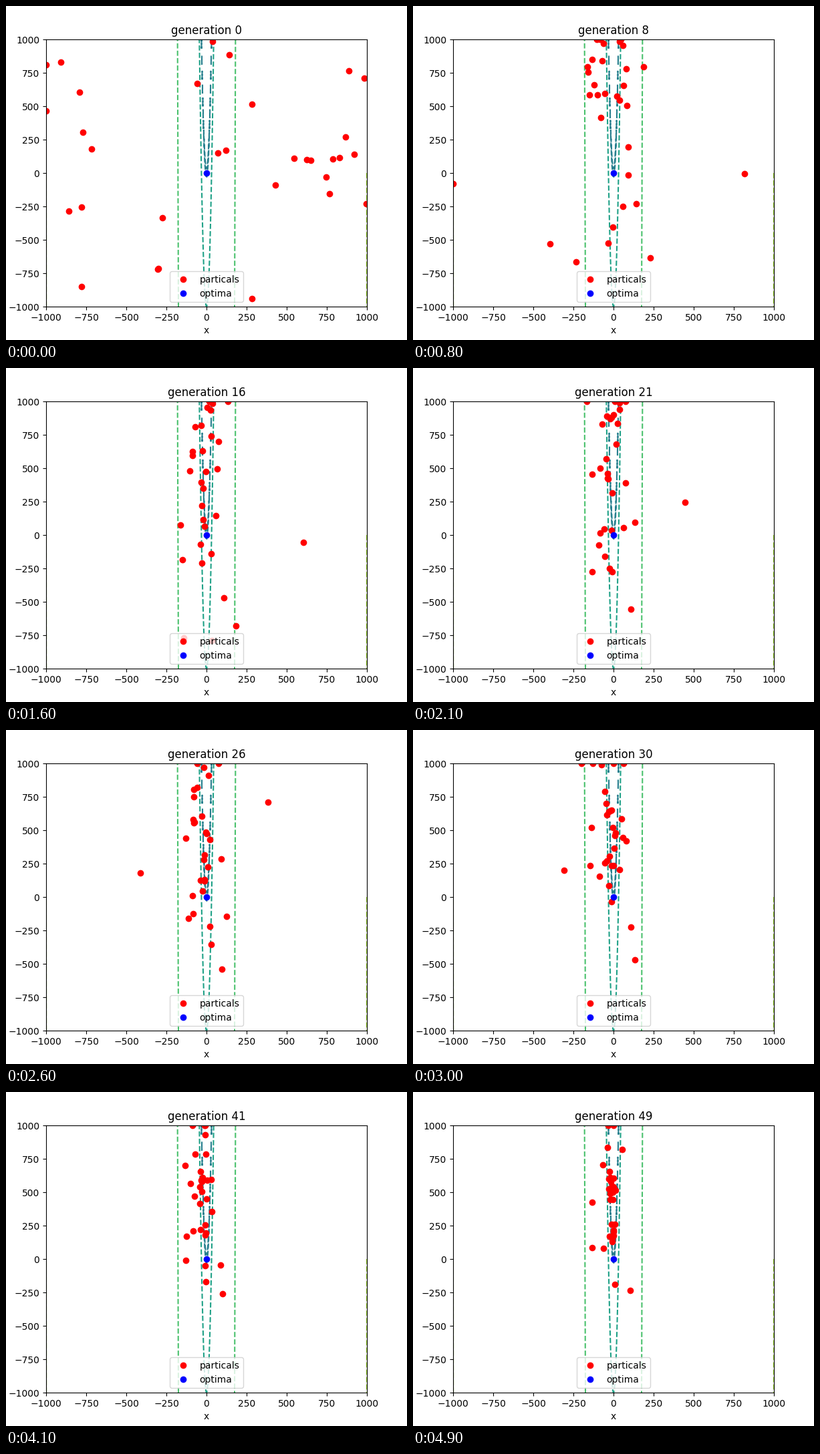
A matplotlib script for the animation above (6000 ms loop, 600 by 500 pixels).

```python
import numpy as np
import matplotlib.pyplot as plt
from matplotlib.animation import FuncAnimation

LIMIT = 1000
LAST = 49        # final generation, held to the end of the loop
FRAMES = 60
INTERVAL = 100   # ms
BEST = 13        # early leader, stays put while the others search
BEST_UNTIL = 20

START = np.array([
    (-1000, 812), (-908, 830), (-792, 605), (-1000, 465), (-770, 305), (-717, 180),
    (-858, -285), (-780, -255), (-780, -850), (-275, -335), (-300, -715), (-304, -720),
    (-58, 670), (38, 985), (142, 885), (283, 515), (72, 150), (121, 170),
    (430, -90), (547, 110), (625, 100), (650, 95), (745, -30), (787, 105),
    (830, 115), (867, 270), (920, 140), (887, 765), (983, 710), (767, -155),
    (995, -230), (283, -940)], float)
FINISH = np.array([
    (-33, 1000), (-38, 835), (-67, 705), (-25, 655), (-133, 425), (-133, 85),
    (-62, 80), (-28, 600), (-30, 525), (-20, 490), (-20, 445), (-25, 170),
    (-20, 610), (-15, 580), (0, 1000), (53, 820), (-10, 545), (-5, 500),
    (104, -235), (8, -190), (12, 515), (8, 260), (0, 605), (0, 540),
    (-4, 445), (-12, 260), (0, 215), (-2, 175), (3, 525), (-8, 130),
    (0, 205), (-10, 150)], float)

rng = np.random.default_rng(12)
COUNT = len(START)
rate = rng.uniform(0.45, 1.2, (COUNT, 2)) * rng.choice([-1, 1], (COUNT, 2))
reach = np.column_stack([170 * rng.lognormal(0, 1.0, COUNT),
                         1000 * rng.lognormal(0, 0.5, COUNT)])
fade = np.array([20, 25])


def swarm(gen):
    """Particles swing around their resting points with shrinking reach."""
    leave = np.exp(-gen / 3)
    approach = (START - FINISH) * leave * np.cos(rate * gen)
    swing = reach * np.exp(-gen / fade) * np.sin(rate * (LAST - gen))
    points = FINISH + approach + (1 - leave) * swing
    if gen < BEST_UNTIL:
        points[BEST] = START[BEST]
    return np.clip(points, -LIMIT, LIMIT)


def rosenbrock(x, y):
    return (1 - x) ** 2 + 100 * (y - x ** 2) ** 2


fig = plt.figure(figsize=(6, 5), dpi=100)
ax = fig.add_axes([0.1, 0.1, 0.8, 0.8])

axis = np.linspace(-LIMIT, LIMIT, 1000)
X, Y = np.meshgrid(axis, axis)
ax.contour(X, Y, rosenbrock(X, Y), levels=[1e5, 1e8, 1e11, 1e14],
           colors=plt.cm.viridis(np.arange(3, 7) / 7), linestyles="dashed")

particles, = ax.plot([], [], "ro", label="particals")
ax.plot(0, 0, "bo", label="optima")
ax.set(xlim=(-LIMIT, LIMIT), ylim=(-LIMIT, LIMIT), xlabel="x")
ax.legend(loc="lower center")
title = ax.set_title("generation 0")


def update(frame):
    gen = min(frame, LAST)
    particles.set_data(*swarm(gen).T)
    title.set_text(f"generation {gen}")
    return particles, title


anim = FuncAnimation(fig, update, frames=FRAMES, interval=INTERVAL,
                     repeat=True, repeat_delay=0)
plt.show()
```
